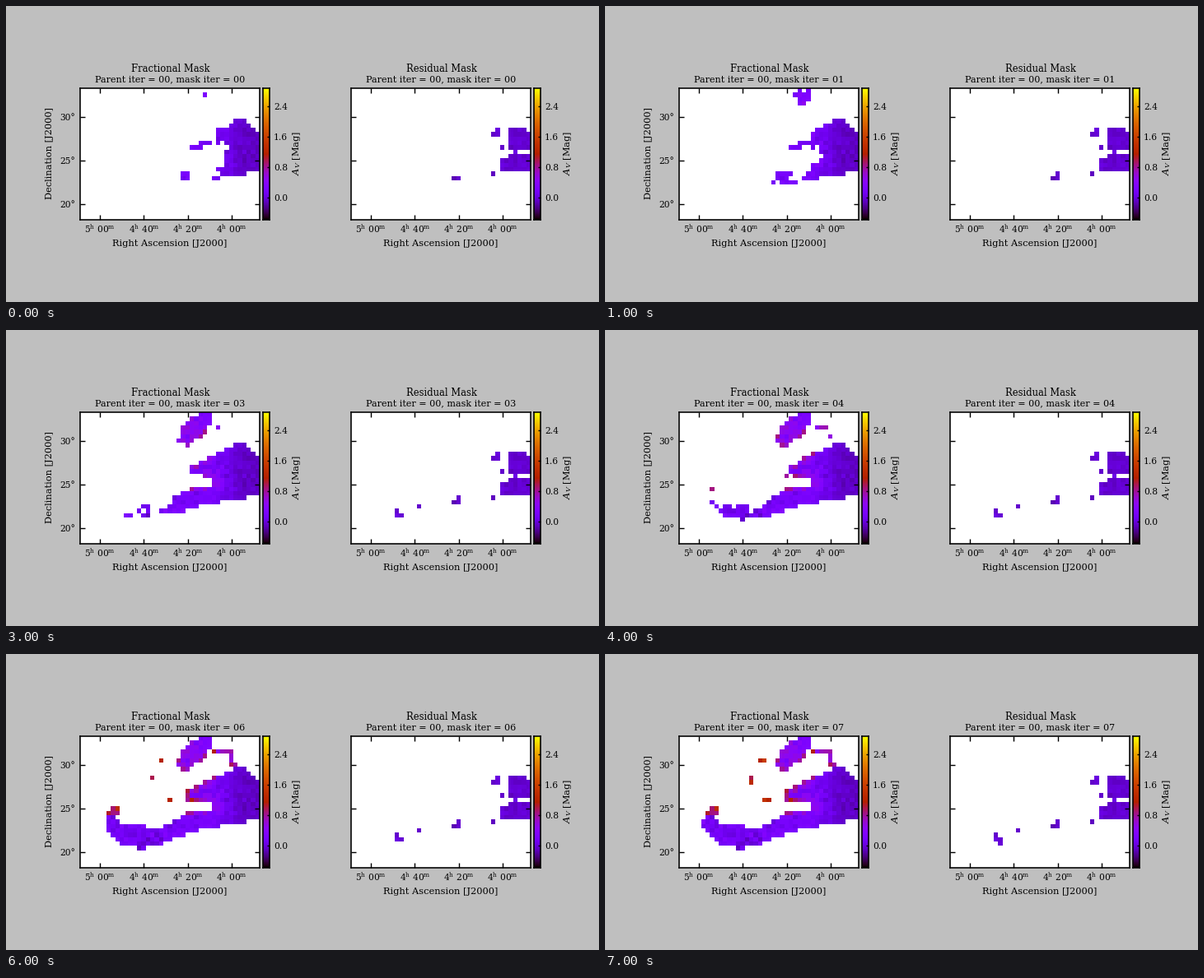
Animation, 720 px wide and 360 px high, one loop 8000 ms. Source, as a matplotlib script:

```python
import numpy as np
import matplotlib.pyplot as plt
from matplotlib.animation import FuncAnimation

plt.rcParams.update({"font.family": "DejaVu Serif", "mathtext.fontset": "dejavuserif",
                     "axes.linewidth": 1.6})

W, H = 720, 360
ROWS, COLS, STEPS = 30, 41, 8
VMIN, VMAX = -0.584, 2.876

# Cell centres, in units of one cell
y, x = np.mgrid[:ROWS, :COLS] + 0.5
rng = np.random.RandomState(4)
jitter = rng.uniform(-1, 1, (ROWS, COLS))
noise = rng.normal(0, 1, (ROWS, COLS))

# Key points of the filaments: column, row, half-width, step of appearance
NORTH = [(28.7, 1.4, 1.7, 0.7), (27, 3, 2.4, 1.2), (23.7, 6, 1.8, 2.6)]
ARC = [(31, 3.5, 0.7, 3.2), (34, 3.7, 0.7, 3.4), (34.8, 6.5, 0.7, 5), (36.5, 7.5, 0.8, 3.5)]
SPUR = [(29.8, 12.5, 0.6, -1.2), (25.5, 13.5, 0.6, -1)]
TAIL = [(24, 20.3, 2, 0.2), (18, 23, 1.7, 4.5), (14, 23, 2.6, 3.8),
        (10, 22.3, 2.5, 4), (6.8, 20, 1.4, 5), (7.7, 16.6, 1, 5.2)]
ISLANDS = [(10.9, 23.5, 1, 1.6), (14.9, 21.5, 1, 1.6), (18.8, 5.5, 1, 5.7),
           (16.5, 9.8, 1, 5.7), (20.3, 14.5, 1, 5.7)]
REMNANTS = [(33.2, 10.3, 1, -1), (34.5, 13.5, 0.5, 0), (32.5, 19.5, 0.5, 0),
            (24.2, 20.3, 1, -0.6), (10.8, 23.3, 1, 1.4), (15.5, 21.5, 0.5, 2),
            (11.5, 24.5, 0.5, 7)]


def segment(a, b):
    """Step at which each cell near the segment appears, growing from its spine."""
    (ax, ay, aw, at), (bx, by, bw, bt) = a, b
    dx, dy = bx - ax, by - ay
    along = ((x - ax) * dx + (y - ay) * dy) / max(dx * dx + dy * dy, 1e-9)
    s = np.clip(along, 0, 1)
    dist = np.hypot(x - ax - s * dx, y - ay - s * dy) / (aw + s * (bw - aw))
    return np.where(dist <= 1, at + s * (bt - at) + 2 * dist, np.inf)


def filament(points):
    return np.min([segment(a, b) for a, b in zip(points, points[1:])], axis=0)


def islands(points):
    return np.min([segment(p, p) for p in points], axis=0)


def main_cloud():
    """A wedge opening to the east, eaten by a notch between its two arms."""
    depth = y - (12.3 - 0.44 * (x - 24))
    inside = (depth > 0) & (x > 24) & (y > x - 30.2) & (y < 22 - 0.18 * (x - 24))
    notch = (np.abs(y - 16) < 1) & (x < 30)
    birth = (35 - x) / 2.2 - 0.45 * np.abs(y - 15) + 0.9
    birth += 6 * np.clip(0.7 - depth, 0, 1)
    return np.where(inside & ~notch, birth, np.inf)


def residual_cloud():
    upper = (y > 9) & (y < 14) & (x > 36) & (y > x - 30.2)
    lower = (y > 15) & (y < 19) & (x > 34 + 1.5 * (y < 16))
    bridge = (np.abs(y - 14.5) < 0.5) & (np.abs(x - 37.5) < 0.5)
    return np.where(upper | lower | bridge, 0, np.inf)


ragged = [main_cloud()] + [filament(f) for f in (NORTH, ARC, TAIL)]
frac_birth = np.min([np.min(ragged, axis=0) + 0.7 * jitter,
                     filament(SPUR), islands(ISLANDS)], axis=0)
res_birth = np.minimum(residual_cloud(), islands(REMNANTS))

# Extinction falls to the east; northern cells that join later are redder
age = np.clip(np.where(np.isfinite(frac_birth), np.floor(frac_birth), 0), 0, STEPS)
north = y < 18
frac_value = (0.2 - 0.3 * np.clip((x - 30) / 8, 0, 1) - 0.06 * (x < 22)
              + 0.08 * north * age ** 1.4 + (0.05 + 0.015 * age) * noise)
res_value = -0.05 + 0.04 * noise


def shown(value, birth, step):
    return np.ma.masked_where(birth >= step + 1, value)


fig = plt.figure(figsize=(W / 72, H / 72), dpi=72, facecolor="#bfbfbf")


def pixel_axes(left, top, w, h):
    return fig.add_axes([left / W, 1 - (top + h) / H, w / W, h / H])


def label(px, py, s, size=11.4, **kw):
    kw = {"ha": "center", "va": "baseline", **kw}
    return fig.text(px / W, 1 - py / H, s, size=size, **kw)


def turned(px, py, s):
    label(px, py, s, rotation=90, va="center")


def panel(x0, name):
    ax = pixel_axes(x0, 100, 218, 160)
    image = ax.imshow(np.zeros((ROWS, COLS)), cmap="gnuplot", vmin=VMIN, vmax=VMAX,
                      aspect="auto", extent=(0, 218, 160, 0), interpolation="nearest")
    ax.set_xticks(24.2 + 53.2 * np.arange(4), [])
    ax.set_yticks(35 + 53 * np.arange(3), [])
    ax.tick_params(direction="in", top=True, right=True, length=6, width=1.4)
    for i, tick in enumerate(ax.get_xticks()):
        h, m = divmod(300 - 20 * i, 60)
        label(x0 + tick, 276, rf"${h}^{{\mathrm{{h}}}}\ {m:02d}^{{\mathrm{{m}}}}$", 10.6)

    bar = pixel_axes(x0 + 222, 100, 7.6, 160)
    bar.imshow(np.linspace(VMIN, VMAX, 256)[:, None], cmap="gnuplot", origin="lower",
               aspect="auto", extent=(0, 1, VMIN, VMAX))
    marks = 0.8 * np.arange(4)
    bar.set_xticks([])
    bar.set_yticks(marks, [])
    bar.tick_params(direction="in", left=False, right=True, length=3.5, width=1.4)
    for v in marks:
        py = 260 - (v - VMIN) / (VMAX - VMIN) * 160
        label(x0 + 235, py + 4, f"{v:.1f}", 10.6, ha="left")
    turned(x0 + 263, 179, "$A_V$ [Mag]")

    label(x0 + 109.5, 80.3, name, 11.5)
    label(x0 + 109, 292, "Right Ascension [J2000]")
    return image, label(x0 + 109, 92.5, "", 11.1)


left_image, left_title = panel(90, "Fractional Mask")
right_image, right_title = panel(419, "Residual Mask")
turned(53, 179, "Declination [J2000]")
for i in range(3):
    label(84, 139 + 53 * i, f"{30 - 5 * i}°", 10.6, ha="right")


def draw(step):
    left_image.set_data(shown(frac_value, frac_birth, step))
    right_image.set_data(shown(res_value, res_birth, step))
    for title in (left_title, right_title):
        title.set_text(f"Parent iter = 00, mask iter = {step:02d}")
    return left_image, right_image, left_title, right_title


anim = FuncAnimation(fig, draw, frames=STEPS, interval=1000, repeat=True)
plt.show()
```
